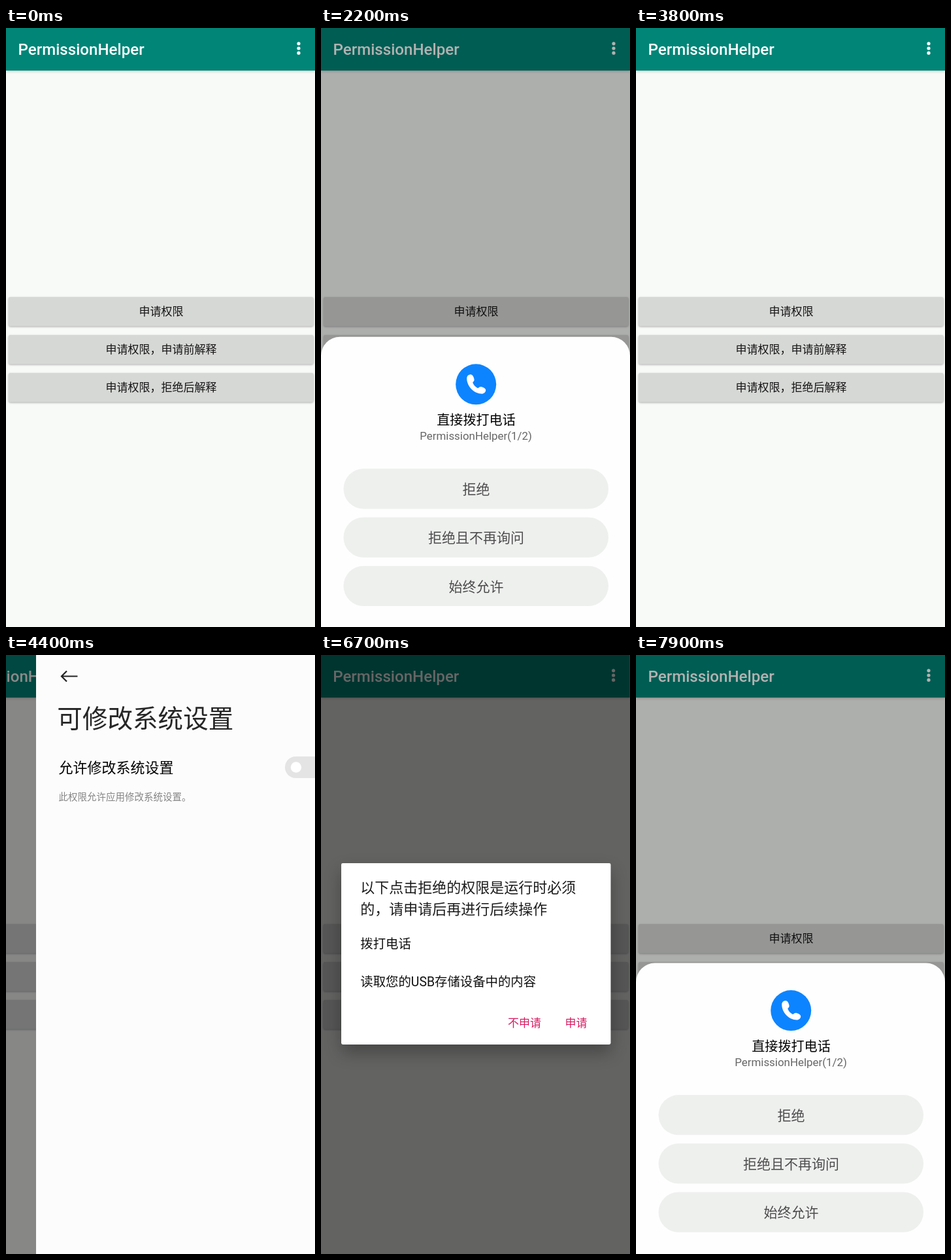
An HTML page with a canvas for the animation above (8000 ms loop, 473 by 915 pixels).

```html
<!DOCTYPE html>
<html lang="zh-CN">
<head>
<meta charset="utf-8">
<title>PermissionHelper</title>
<style>
html, body { margin: 0; width: 100%; height: 100%; overflow: hidden; background: #f8faf7; }
canvas { display: block; }
</style>
</head>
<body>
<canvas id="stage" width="473" height="915"></canvas>
<script>
const W = 473, H = 915, LOOP = 8000, STEP = 100;
const BLUE = '#0d84ff';
const FONT = 'Roboto, "Noto Sans CJK SC", "Noto Sans CJK", sans-serif';
const stage = document.getElementById('stage').getContext('2d');
const layer = document.createElement('canvas');
layer.width = W;
layer.height = H;
const layerCtx = layer.getContext('2d');
let ctx = stage;

const clamp = v => Math.max(0, Math.min(1, v));
const ramp = (t, start, length) => clamp((t - start) / length);

// Critically damped spring from 0 to 1; t in ms
function spring(t, rate) {
  const x = Math.max(0, t) * rate / 1000;
  return 1 - (1 + x) * Math.exp(-x);
}

function text(str, x, y, size, color, { weight = 400, align = 'left' } = {}) {
  ctx.font = `${weight} ${size}px ${FONT}`;
  ctx.textAlign = align;
  ctx.fillStyle = color;
  ctx.fillText(str, x, y + size * 0.38);
}

function label(str, x, y, size, color, weight = 400) {
  text(str, x, y, size, color, { weight, align: 'center' });
}

function box(x, y, w, h, r, color) {
  ctx.fillStyle = color;
  ctx.beginPath();
  ctx.roundRect(x, y, w, h, r);
  ctx.fill();
}

function disc(x, y, r, color) {
  ctx.fillStyle = color;
  ctx.beginPath();
  ctx.arc(x, y, r, 0, 7);
  ctx.fill();
}

function shadowed(alpha, blur, dy, draw) {
  ctx.save();
  ctx.shadowColor = `rgba(0,0,0,${alpha})`;
  ctx.shadowBlur = blur;
  ctx.shadowOffsetY = dy;
  draw();
  ctx.restore();
}

function dim(alpha) {
  if (alpha <= 0) return;
  ctx.fillStyle = `rgba(0,0,0,${alpha})`;
  ctx.fillRect(0, 0, W, H);
}

function drawMain(pressed) {
  ctx.fillStyle = '#f8faf7';
  ctx.fillRect(0, 0, W, H);
  shadowed(0.25, 4, 1, () => box(0, 0, W, 65, 0, '#008577'));
  text('PermissionHelper', 18.5, 31.8, 24.1, '#fff', { weight: 500 });
  for (const y of [23.8, 31, 38.2]) disc(448, y, 2.6, '#fff');
  ['申请权限', '申请权限，申请前解释', '申请权限，拒绝后解释'].forEach((str, i) => {
    const y = 411 + 58 * i;
    const color = pressed && i === 2 ? '#c4c5c2' : '#d6d8d5';
    shadowed(0.3, 3, 1, () => box(4, y, 466.5, 44.5, 2.4, color));
    label(str, 237.5, y + 22, 17, '#161616');
  });
}

function phoneIcon() {
  ctx.fillStyle = '#fff';
  ctx.fill(new Path2D('M-14-9C-14-13-11-15-8-15C-6-15-4-13-3-9C-2-6-3-5-5-3' +
    'C-4 1-1 4 3 6C5 4 6 3 9 4C13 5 15 7 15 9C15 12 12 14.5 9 14.5C-3 14.5-14 3-14-9Z'));
}

function filesIcon() {
  ctx.fillStyle = '#fff';
  ctx.fill(new Path2D('M-9-9.5H2Q4-9.5 5.5-8L7-6.5Q8.5-5 8.5-3V12.5Q8.5 15.5 5.5 15.5' +
    'H-9Q-12 15.5-12 12.5V-6.5Q-12-9.5-9-9.5Z'));
  ctx.strokeStyle = '#fff';
  ctx.lineWidth = 3;
  ctx.lineCap = 'round';
  ctx.stroke(new Path2D('M-4-13.5H3Q6-13.5 8-11.5L11.5-8Q13.5-6 13.5-3V9'));
}

const phoneSheet = {
  icon: phoneIcon, title: '直接拨打电话', count: '(1/2)',
  buttons: ['拒绝', '拒绝且不再询问', '始终允许'], accent: -1
};
const filesSheet = {
  icon: filesIcon, title: '读取设备上的照片及文件', count: '(2/2)',
  buttons: ['拒绝', '始终允许', '仅在使用中允许'], accent: 2
};
const sheets = [
  { ...phoneSheet, from: 1740, to: 2500 },
  { ...filesSheet, from: 2540, to: 3400 },
  { ...phoneSheet, from: 7387, to: 9000 }
];

const sheetLeave = (sheet, t) => ramp(t, sheet.to, 200);
const sheetDim = (sheet, t) => 0.3 * ramp(t, sheet.from, 200) * (1 - sheetLeave(sheet, t));

function drawSheet(sheet, t) {
  const leave = sheetLeave(sheet, t);
  if (t < sheet.from || leave === 1) return;
  const rise = spring(t - sheet.from - 140, 24) * (1 - leave);
  ctx.save();
  ctx.translate(0, 445 * (1 - rise));
  box(0, 470, W, H, [29, 29, 0, 0], '#fdfefd');
  disc(237.2, 542.5, 31, BLUE);
  ctx.save();
  ctx.translate(237.2, 542.5);
  sheet.icon();
  ctx.restore();
  label(sheet.title, 237.5, 596.5, 20.1, '#000', 500);
  label('PermissionHelper' + sheet.count, 237, 621, 16.9, '#666');
  sheet.buttons.forEach((str, i) => {
    const y = 671.5 + 74.2 * i, hot = i === sheet.accent;
    box(34.5, y, 405.5, 61.3, 30.6, hot ? BLUE : '#eef0ee');
    label(str, 237.5, y + 31, 21, hot ? '#fff' : '#4c4c4c', 500);
  });
  ctx.restore();
}

const dialogAlpha = t => ramp(t, 6400, 200) * (1 - ramp(t, 7410, 220));

function drawDialog(t) {
  const alpha = dialogAlpha(t);
  if (alpha === 0) return;
  ctx = layerCtx;
  ctx.clearRect(0, 0, W, H);
  shadowed(0.3, 26, 12, () => box(31, 318, 412.5, 277, 2.4, '#fff'));
  text('以下点击拒绝的权限是运行时必须', 60.3, 355, 22, '#1c1c1c');
  text('的，请申请后再进行后续操作', 60.3, 387.5, 22, '#1c1c1c');
  text('拨打电话', 60.3, 440.5, 19.4, '#111');
  text('读取您的USB存储设备中的内容', 60.3, 498.5, 19.4, '#111');
  const ripple = ramp(t, 7120, 200);
  if (ripple > 0) disc(390, 557, 25 * ripple, 'rgba(0,0,0,0.06)');
  label('不申请', 311.5, 561.5, 17, '#d81b60');
  label('申请', 390.5, 561.5, 17, '#d81b60');
  ctx = stage;
  ctx.globalAlpha = alpha;
  ctx.drawImage(layer, 0, 0);
  ctx.globalAlpha = 1;
}

function drawSettings(x, t) {
  ctx.save();
  ctx.translate(x, 0);
  ctx.fillStyle = '#fcfcfc';
  ctx.fillRect(0, 0, W, H);
  ctx.strokeStyle = '#222';
  ctx.lineWidth = 2.2;
  ctx.lineCap = 'butt';
  ctx.stroke(new Path2D('M63.5 32.5H39.5M47 24.5L39 32.5L47 40.5'));
  text('可修改系统设置', 32.3, 96.5, 38.6, '#262626');
  text('允许修改系统设置', 34.6, 171.2, 22, '#000');
  text('此权限允许应用修改系统设置。', 34.5, 216.2, 14.5, '#858585');
  const k = ramp(t, 5230, 270), on = k * k * (3 - 2 * k);
  box(381, 155, 59.3, 33, 16.5, '#e3e4e3');
  ctx.globalAlpha = on;
  box(381, 155, 59.3, 33, 16.5, BLUE);
  ctx.globalAlpha = 1;
  disc(398 + 26 * on, 171.5, 8.2, '#fff');
  ctx.restore();
}

function draw(t) {
  const open = t < 6308 ? spring(t - 4208, 20.4) : 1 - spring(t - 6308, 20.4);
  ctx.save();
  ctx.translate(-W / 4 * open, 0);
  drawMain(t >= 1500 && t < 1800);
  ctx.restore();
  dim(0.51 * open);
  dim(0.6 * dialogAlpha(t));
  for (const sheet of sheets) dim(sheetDim(sheet, t));
  drawDialog(t);
  for (const sheet of sheets) drawSheet(sheet, t);
  if (open > 0.005) drawSettings(Math.round(W * (1 - open)), t);
}

let origin = null;
function tick(now) {
  if (origin === null) origin = now;
  const t = (now - origin) % LOOP;
  draw(Math.floor(t / STEP) * STEP);
  requestAnimationFrame(tick);
}
draw(0);
requestAnimationFrame(tick);
</script>
</body>
</html>
```
